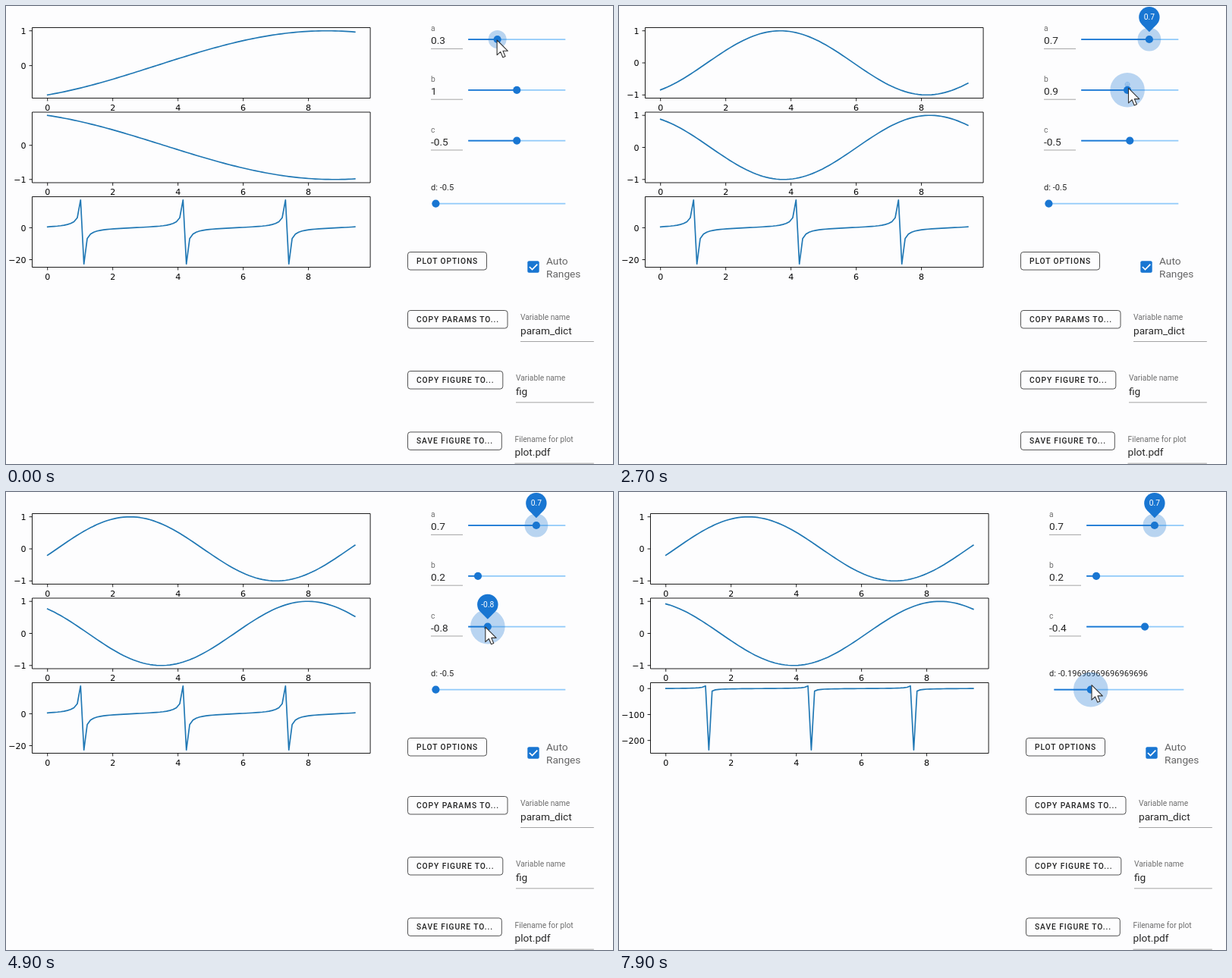
Recreate the animation shown at these times as an HTML page. Size 800 by 604 pixels, loop 8000 ms.

```html
<!DOCTYPE html>
<html lang="en">
<head>
<meta charset="utf-8">
<title>Interactive plot controls</title>
<style>
  html, body { margin: 0; width: 100%; height: 100%; overflow: hidden; background: #fdfdfe; }
  svg { display: block; width: 800px; height: 604px; font-family: Roboto, sans-serif; }
  .label { font-size: 10.26px; fill: rgba(0,0,0,.57); }
  .value { font-size: 13.68px; fill: rgba(0,0,0,.85); }
  .check { font-size: 13.68px; fill: rgba(0,0,0,.6); }
  .d { font-size: 11.1px; fill: rgba(0,0,0,.85); }
  .line { stroke: rgba(0,0,0,.42); stroke-width: .86; }
  .button rect { fill: none; stroke: rgba(0,0,0,.75); stroke-width: .9; }
  .button text { font-size: 10.26px; font-weight: 500; letter-spacing: .0893em; fill: rgba(0,0,0,.87); }
  .track { stroke: #90caf9; stroke-width: 1.75; }
  .fill { stroke: #1976d2; stroke-width: 1.75; }
  .thumb, .pin path { fill: #1976d2; }
  .halo { fill: #1976d2; opacity: .3; }
  .pin text { font-size: 10.26px; fill: #fff; text-anchor: middle; }
  .axes { fill: none; stroke: #000; stroke-width: .89; }
  .curve { fill: none; stroke: #1f77b4; stroke-width: 1.67; stroke-linejoin: round; stroke-linecap: square; }
  .tick { font: 11.11px "DejaVu Sans", sans-serif; }
  .cursor { fill: #fff; stroke: #333; stroke-width: 1.1; stroke-linejoin: round; }
</style>
</head>
<body>
<svg viewBox="0 0 800 604">
  <g id="plots"></g>
  <g id="panel">
    <g id="form"></g>
    <rect x="687.3" y="336.3" width="15.4" height="15.4" rx="2" fill="#1976d2"/>
    <path d="M689.9 344l3.6 3.6l6.8-6.9" fill="none" stroke="#fff" stroke-width="1.7"/>
    <text class="check" x="712" y="341">Auto</text>
    <text class="check" x="712" y="358">Ranges</text>
    <g id="sliders"></g>
  </g>
  <path id="cursor" class="cursor" d="M0 0V19.6L4.6 15.4L7.7 22.7L10.9 21.4L7.9 14.3H14.3Z"/>
</svg>
<script>
const LOOP = 8000, STEP = 100, PLOT_LAG = 250, FADE = 200;
const TRACK_START = 609.2, TRACK_END = 737.3, D_START = 566.4, D_Y = 260.6;
const byId = id => document.getElementById(id);
const clamp = p => Math.min(1, Math.max(0, p));
const ramp = (t, from, to) => clamp((t - from) / (to - from));
const mix = (a, b, p) => a + (b - a) * p;
const smooth = p => p * p * (3 - 2 * p);
const tenth = v => Math.round(v * 10) / 10;

// Fades in after down, out after up
const press = (t, down, up) => Math.min(ramp(t, down, down + FADE), 1 - ramp(t, up, up + FADE));

// Raw values follow the pointer, grip is its offset from the thumb
const sliders = {
  a: { y: 44, min: 0, span: 1, down: -105, up: 1850, focus: 15.4, grip: [-.5, 1],
    raw: t => mix(.3, .7, ramp(t, 200, 1700)) },
  b: { y: 110.8, min: 0, span: 2, down: 2500, up: 3464, focus: 0, grip: [2.5, -2.5],
    raw: t => mix(1, .2, ramp(t, 2650, 3250)) },
  c: { y: 177.6, min: -1, span: 1, down: 4200, up: 6250, focus: 0, grip: [-3, .5],
    raw: t => mix(-.5, -.8, ramp(t, 4400, 4750)) + mix(0, .4, ramp(t, 5300, 6050)) },
};
const steps = Object.values(sliders);
const valueOf = (s, t) => tenth(s.raw(t));
const thumbX = (s, v) => mix(TRACK_START, TRACK_END, (v - s.min) / s.span);

const D_DOWN = 6550, D_KEYS = [[6750, 0], [7050, 7], [7200, 13], [7300, 21], [7650, 24], [7800, 30], [7900, 28]];
function dIndex(t) {
  const i = D_KEYS.findIndex(([time]) => t <= time);
  if (i <= 0) return 0;
  const [t0, v0] = D_KEYS[i - 1], [t1, v1] = D_KEYS[i];
  return Math.round(mix(v0, v1, ramp(t, t0, t1)));
}
const dValue = t => -.5 + dIndex(t) * (1 / 99);

// Stays on each slider while it is held, then glides to the next
function cursorAt(t) {
  const stops = steps.map(s => ({
    down: s.down, up: s.up,
    at: [thumbX(s, s.raw(t)) + s.grip[0], s.y + s.grip[1]],
  }));
  stops.push({ down: D_DOWN, up: LOOP, at: [mix(568, 623, ramp(t, 6650, 7900)), D_Y - 6] });
  const i = stops.findLastIndex(s => t >= s.down);
  const here = stops[i], next = stops[i + 1];
  if (!next) return here.at;
  const p = smooth(ramp(t, here.up, next.down));
  return here.at.map((v, k) => mix(v, next.at[k], p));
}

// Static form
const field = (x, y, end, label, value, id = "") => `
  <text class="label" x="${x}" y="${y}">${label}</text>
  <text class="value" x="${x}" y="${y + (id ? 16.6 : 18.6)}" id="${id}">${value}</text>
  <path class="line" d="M${x} ${y + (id ? 23 : 28.5)}H${end}"/>`;
const button = (y, width, text) => `
  <g class="button"><rect x="529.5" y="${y}" width="${width}" height="23.5" rx="3.4"/>
  <text x="541" y="${y + 15.5}">${text}</text></g>`;

byId("form").innerHTML =
  Object.entries(sliders).map(([name, s]) => field(560, s.y - 10.6, 602, name, "", "value-" + name)).join("") +
  '<text class="d" x="560" y="242.5" id="value-d"></text>' +
  button(324.5, 104, "PLOT OPTIONS") +
  button(401.5, 131.5, "COPY PARAMS TO...") +
  button(481.5, 125.3, "COPY FIGURE TO...") +
  button(561.9, 123.8, "SAVE FIGURE TO...") +
  field(678, 414, 774.8, "Variable name", "param_dict") +
  field(672, 494.3, 774.8, "Variable name", "fig") +
  field(670.5, 574.7, 774.8, "Filename for plot", "plot.pdf");

function slider(x0, x, y, halo, pin = 0, text = "") {
  const balloon = pin > 0 ? `
    <g class="pin" transform="translate(${x} ${y}) scale(${pin})" opacity="${pin}">
      <path transform="translate(0 -29.2) rotate(45)" d="M13.7 13.7V0A13.7 13.7 0 1 0 0 13.7Z"/>
      <text y="-25.6">${text}</text></g>` : "";
  return `<path class="track" d="M${x0} ${y}H${TRACK_END}"/><path class="fill" d="M${x0} ${y}H${x}"/>
    <circle class="thumb" cx="${x}" cy="${y}" r="5.1"/>
    <circle class="halo" cx="${x}" cy="${y}" r="${halo}"/>${balloon}`;
}

function drawSlider(s, t) {
  const value = valueOf(s, t), x = thumbX(s, (value + valueOf(s, t - 100)) / 2);
  const rest = t > s.up ? s.focus : 0;
  const halo = mix(rest, 22.8, press(t, s.down, s.up + 50));
  const pin = press(t, s.down + 150, s.focus ? LOOP : s.up);
  return slider(TRACK_START, x, s.y, halo, pin, value);
}

// Plots
const END = 3 * Math.PI, SAMPLES = 94;
const xs = Array.from({ length: SAMPLES }, (_, i) => i * END / (SAMPLES - 1));
const LEFT = 34.5, WIDTH = 445.6, HEIGHT = 93, FONT = 11.11, TICK = 3.9;

// Round tick positions, at most four intervals
function niceTicks(lo, hi) {
  const raw = (hi - lo) / 4, scale = 10 ** Math.floor(Math.log10(raw));
  const step = scale * [1, 2, 2.5, 5, 10].find(m => m * scale >= raw);
  const digits = Number.isInteger(step) ? 0 : 1;
  const ticks = [];
  for (let k = Math.ceil(lo / step); k * step <= hi; k++) {
    const v = k * step;
    ticks.push({ v, text: (v < 0 ? "−" : "") + Math.abs(v).toFixed(digits) });
  }
  return ticks;
}

const labelWidth = s => [...s].reduce((w, ch) => w + (ch === "−" ? .838 : ch === "." ? .318 : .636), 0);

function layout(f) {
  const ys = xs.map(f), min = Math.min(...ys), max = Math.max(...ys), pad = (max - min) * .05;
  return { ys, lo: min - pad, hi: max + pad, ticks: niceTicks(min - pad, max + pad) };
}

function drawPlot({ ys, lo, hi, ticks }, top) {
  const bottom = top + HEIGHT;
  const px = x => LEFT + WIDTH * (x / END + .05) / 1.1;
  const py = y => bottom - HEIGHT * (y - lo) / (hi - lo);
  let marks = "", labels = "";
  for (let x = 0; x <= 8; x += 2) {
    marks += `M${px(x)} ${bottom}v${TICK}`;
    labels += `<text class="tick" text-anchor="middle" x="${px(x)}" y="${bottom + 16.2}">${x}</text>`;
  }
  for (const { v, text } of ticks) {
    marks += `M${LEFT} ${py(v)}h${-TICK}`;
    labels += `<text class="tick" text-anchor="end" x="${LEFT - 2 * TICK}" y="${py(v) + 4.2}">${text}</text>`;
  }
  const points = ys.map((y, i) => px(xs[i]).toFixed(2) + "," + py(y).toFixed(2)).join(" ");
  return `<polyline class="curve" points="${points}"/>
    <path class="axes" d="M${LEFT} ${top}h${WIDTH}v${HEIGHT}h${-WIDTH}z${marks}"/>${labels}`;
}

function draw(t) {
  const past = t - PLOT_LAG;
  const [a, b, c] = steps.map(s => valueOf(s, past));
  const d = dValue(past);
  const plots = [x => Math.sin(a * x - b), x => Math.cos(a * x - c), x => Math.tan(x - d)].map(layout);

  // The widest tick label sets where everything to its right begins
  const widest = Math.max(...plots.flatMap(p => p.ticks.map(k => labelWidth(k.text))));
  const shift = `translate(${Math.round((widest - labelWidth("−20")) * FONT)} 0)`;
  byId("plots").setAttribute("transform", shift);
  byId("panel").setAttribute("transform", shift);
  byId("plots").innerHTML = plots.map((p, i) => drawPlot(p, 28.5 + i * 111.5)).join("");

  for (const name in sliders) byId("value-" + name).textContent = valueOf(sliders[name], t);
  byId("value-d").textContent = "d: " + dValue(t - 100);
  byId("sliders").innerHTML = steps.map(s => drawSlider(s, t)).join("") +
    slider(D_START, mix(D_START, TRACK_END, dIndex(t) / 99), D_Y, 22.8 * press(t, D_DOWN, LOOP));
  byId("cursor").setAttribute("transform", `translate(${cursorAt(t).join(" ")})`);
}

let start, shown = -1;
function frame(now) {
  start ??= now;
  const t = Math.floor((now - start) % LOOP / STEP) * STEP;
  if (t !== shown) draw(shown = t);
  requestAnimationFrame(frame);
}
draw(0);
requestAnimationFrame(frame);
</script>
</body>
</html>
```
